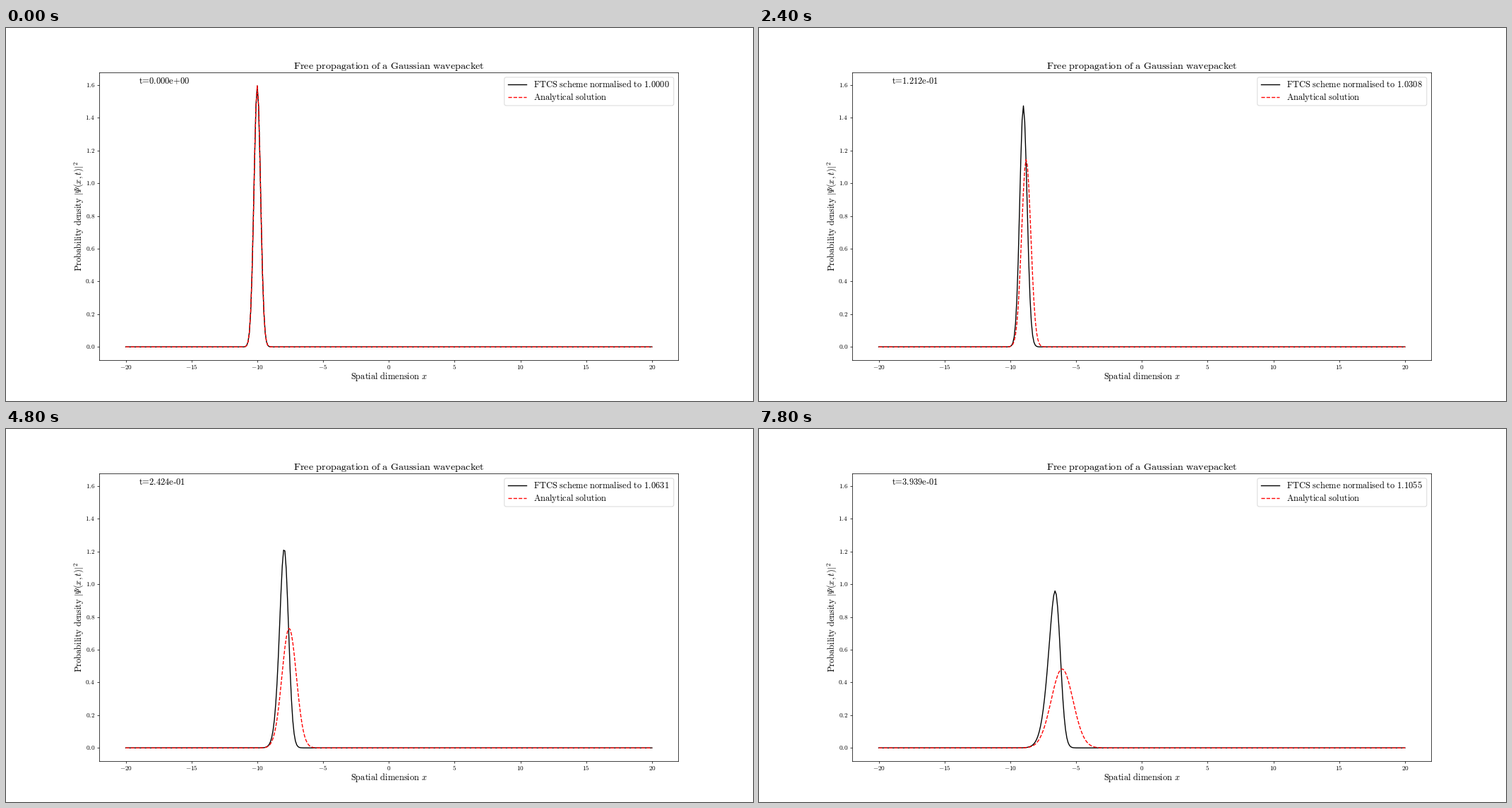
Recreate the animation shown at these times as a matplotlib script. Size 1058x529 px, loop 8000 ms.

```python
import matplotlib.pyplot as plt
import numpy as np
from matplotlib.animation import FuncAnimation
from matplotlib.lines import Line2D
from matplotlib.patches import FancyBboxPatch
from matplotlib.transforms import IdentityTransform

W, H = 1058, 529
FRAMES, INTERVAL = 40, 200
STEPS = 101              # time steps per frame
DT, DX = 1e-4, 0.1
X0, K0, SIGMA = -10.0, 10.0, 0.25
LABEL, TITLE, TICK = 13.6, 15.5, 10

plt.rcParams["mathtext.fontset"] = "cm"
PIXELS = IdentityTransform()

x = np.linspace(-20, 20, 401)


def analytic(t):
    """Probability density of the freely spreading packet."""
    s = SIGMA * np.sqrt(1 + (t / (2 * SIGMA**2)) ** 2)
    return np.exp(-((x - X0 - K0 * t) ** 2) / (2 * s**2)) / (np.sqrt(2 * np.pi) * s)


def simulate():
    """Densities from the explicit FTCS scheme, one per frame."""
    psi = (2 * np.pi * SIGMA**2) ** -0.25 * np.exp(
        -((x - X0) ** 2) / (4 * SIGMA**2) + 1j * K0 * x)
    factor = 0.5j * DT / DX**2
    densities = []
    for _ in range(FRAMES):
        densities.append(np.abs(psi) ** 2)
        for _ in range(STEPS):
            psi[1:-1] += factor * (psi[2:] - 2 * psi[1:-1] + psi[:-2])
    return densities


def roman(s):
    return r"$\mathrm{" + s.replace(" ", r"\ ") + "}$"


def time_label(t):
    # a true hyphen, since mathtext would set "-" as a minus sign
    return r"$\text{" + f"t={t:.3e}".replace("-", "\u2010") + "}$"


def norm_label(density):
    return roman(f"FTCS scheme normalised to {density.sum() * DX:.4f}")


def put(px, py, s, size, **kw):
    """Text with its baseline at a pixel position measured from the top left."""
    return fig.text(px, H - py, s, fontsize=size, va="baseline",
                    transform=PIXELS, **kw)


def legend_line(py, **style):
    fig.add_artist(Line2D([710.9, 736.6], [H - py] * 2, lw=1.5,
                          transform=PIXELS, **style))


numeric = simulate()

fig = plt.figure(figsize=(16, 8), dpi=W / 16, facecolor="white")
ax = fig.add_axes([0.125, 0.11, 0.775, 0.77])
margin = 0.05 * numeric[0].max()
ax.set_xlim(-22, 22)
ax.set_ylim(-margin, numeric[0].max() + margin)

x_ticks = range(-20, 21, 5)
y_ticks = np.arange(9) * 0.2
ax.set_xticks(x_ticks, [""] * len(x_ticks))
ax.set_yticks(y_ticks, [""] * len(y_ticks))
for v in x_ticks:
    put(ax.transData.transform((v, 0))[0], 484, f"${v}$", TICK, ha="center")
for v in y_ticks:
    put(126, H - ax.transData.transform((0, v))[1] + 3, f"${v:.1f}$", TICK, ha="right")

(ftcs,) = ax.plot(x, numeric[0], color="black", lw=1.5)
(exact,) = ax.plot(x, analytic(0), color="red", ls="--", lw=1.5)

put(542, 58, roman("Free propagation of a Gaussian wavepacket"), TITLE, ha="center")
put(542, 498, roman("Spatial dimension") + r"$\ x$", LABEL, ha="center")
PSI = chr(0xAA)          # slot of the slanted capital Psi in Computer Modern italic
put(107, 267, roman("Probability density") + rf"$\ |{PSI}(x,t)|^2$", LABEL,
    ha="center", rotation=90, rotation_mode="anchor")
clock = put(188, 79, time_label(0), LABEL)

fig.add_artist(FancyBboxPatch(
    (705.8, H - 110), 240, 40.1, boxstyle="round,pad=0,rounding_size=2.6",
    fc="white", ec="0.8", lw=1, alpha=0.8, transform=PIXELS))
legend_line(79.6, color="black")
legend_line(97.5, color="red", ls="--")
norm = put(746.6, 84, norm_label(numeric[0]), LABEL)
put(746.6, 102, roman("Analytical solution"), LABEL)


def update(i):
    t = i * STEPS * DT
    ftcs.set_ydata(numeric[i])
    exact.set_ydata(analytic(t))
    clock.set_text(time_label(t))
    norm.set_text(norm_label(numeric[i]))
    return ftcs, exact, clock, norm


anim = FuncAnimation(fig, update, frames=FRAMES, interval=INTERVAL,
                     repeat=True, repeat_delay=0)
plt.show()
```
